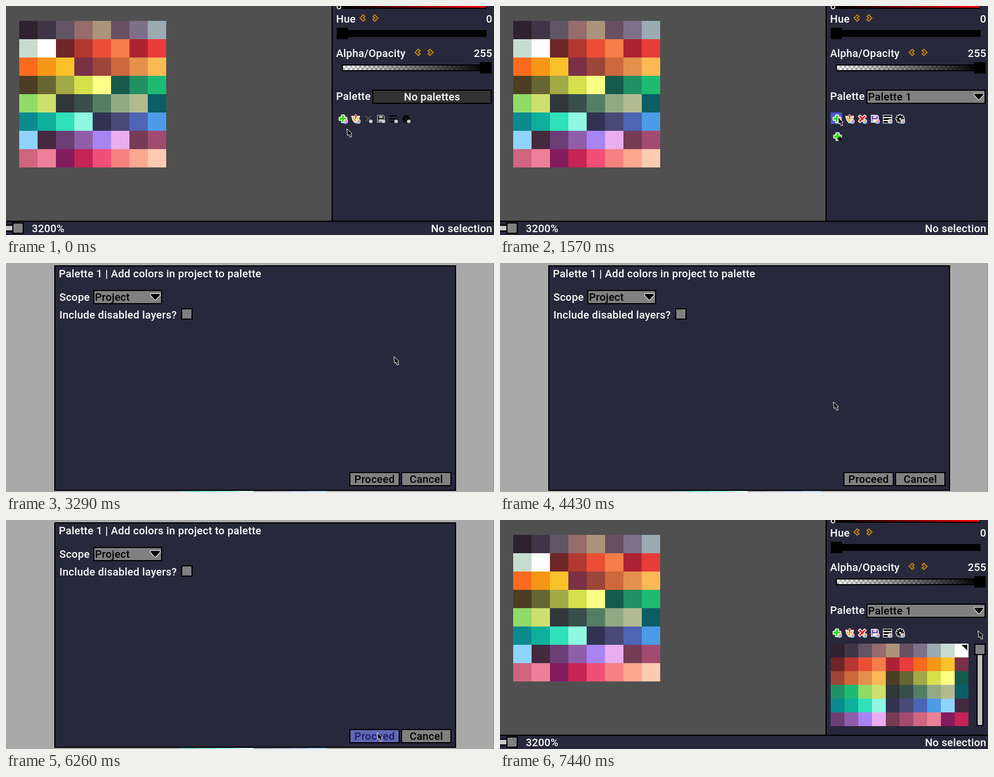
Animation of 850 by 400 pixels, one loop 8000 ms. Source, as an HTML page:

```html
<!DOCTYPE html>
<html lang="en">
<head>
<meta charset="utf-8">
<title>Palette editor</title>
<style>
  html, body { margin: 0; width: 100%; height: 100%; overflow: hidden; background: #505050; }
  svg { display: block; width: 850px; height: 400px; }
  text { font: 500 18.5px Roboto, "Open Sans", sans-serif; letter-spacing: .25px; fill: #fff; }
  text.dark { fill: #000; }
  rect { shape-rendering: crispEdges; }
  .outlined { stroke: #fff; stroke-width: 3; paint-order: stroke; stroke-linejoin: round; }
</style>
</head>
<body>
<svg id="stage" viewBox="0 0 850 400"></svg>
<script>
const LOOP = 8000;
const CANVAS = '#505050', PANEL = '#28283c', GRAY = '#808080';
const COLORS = `2e222f 3e3546 625565 966c6c ab947a 694f62 7f708a 9babb2
  c7dcd0 ffffff 6e2727 b33831 ea4f36 f57d4a ae2334 e83b3b
  fb6b1d f79617 f9c22b 7a3045 9e4539 cd683d e6904e fbb954
  4c3e24 676633 a2a947 d5e04b fbff86 165a4c 239063 1ebc73
  91db69 cddf6c 313638 374e4a 547e64 92a984 b2ba90 0b5e65
  0b8a8f 0eaf9b 30e1b9 8ff8e2 323353 484a77 4d65b4 4d9be6
  8fd3ff 45293f 6b3e75 905ea9 a884f3 eaaded 753c54 a24b6f
  cf657f ed8099 831c5d c32454 f04f78 f68181 fca790 fdcbb0`.split(/\s+/);

const rect = (x, y, w, h, fill, extra = '') =>
  `<rect x="${x}" y="${y}" width="${w}" height="${h}" fill="${fill}" ${extra}/>`;
// Filled box with a 2px black border inside its bounds.
const box = (x, y, w, h, fill, extra = '') =>
  rect(x, y, w, h, '#000') + rect(x + 2, y + 2, w - 4, h - 4, fill, extra);
const text = (x, y, str, anchor = 'start', extra = '') =>
  `<text x="${x}" y="${y}" text-anchor="${anchor}" ${extra}>${str}</text>`;
const at = (x, y, body) => `<g transform="translate(${x} ${y})">${body}</g>`;
const swatches = (list, cols, size, x, y) => list.map((c, i) =>
  rect(x + i % cols * size, y + Math.floor(i / cols) * size, size, size, '#' + c)).join('');

const dropArrow = (x, y) => at(x, y,
  '<path d="M-8-5H8V-3L1 5H-1L-8-3Z" stroke="#fff" stroke-width="2" paint-order="stroke" stroke-linejoin="round"/>');
const chevron = (x, y, dir) => `<path transform="translate(${x} ${y}) scale(${dir} 1)"
  d="M-4.5 0 1-5.5 4.5-3 1.5 0 4.5 3 1 5.5Z" fill="#50340c" stroke="#cf9420" stroke-width="1.5"/>`;
const stepper = (x, y) => chevron(x, y, 1) + chevron(x + 22.5, y, -1);

const plus = '<path class="outlined" d="M-2-6H2V-2H6V2H2V6H-2V2H-6V-2H-2Z" fill="#3fd420"/>';
const wheel = on => at(4.5, 4.5, on
  ? `<circle r="4" fill="#fff"/><path d="M0 0V-3A3 3 0 0 1 3 0Z" fill="#ff70b0"/><path d="M0 0H3A3 3 0 0 1 0 3Z" fill="#b070ff"/>
     <path d="M0 0V3A3 3 0 0 1-3 0Z" fill="#40d0ff"/><path d="M0 0H-3A3 3 0 0 1 0-3Z" fill="#ffd850"/>`
  : '<circle r="3" fill="#d8d8d8"/><circle r="1" fill="#aaa"/>');
const icon = (x, body, on) => at(x, 197, body + wheel(on));

const importIcon = `<path class="outlined" d="M-6-4-3-2 0 1 3-2 6-4 4 2 1 6H-1L-4 2Z" fill="#f0b028"/>
  <path d="M0-8 4-4H1.5V1H-1.5V-4H-4Z" fill="#e04828" stroke="#fff" stroke-width=".8"/>`;
const cross = on => `<path ${on ? 'class="outlined"' : ''} fill="${on ? '#f01818' : '#484850'}"
  d="M-6-4-4-6 0-2 4-6 6-4 2 0 6 4 4 6 0 2-4 6-6 4-2 0Z"/>`;
const floppy = on => `<path d="M-6-6H4L6-4V6H-6Z" fill="${on ? '#6048a0' : '#222'}" stroke="${on ? '#fff' : '#999'}" stroke-width="1.5"/>
  ${rect(-3, -5, 6, 4, on ? '#d8ccff' : '#aaa')}${rect(-4, 1, 8, 4, on ? '#fff' : '#bbb')}`;
const lines = on => [-6, -1, 4].map(y =>
  (on ? rect(-8, y - 1, 16, 5, '#fff') : '') + rect(-7, y, 14, on ? 3 : 2, '#000')).join('');
const gearShape = (color, grow) =>
  `<g stroke="${color}" stroke-width="${2.6 + grow}"><circle r="${5 + grow / 2}" fill="${color}" stroke="none"/>
  ${[0, 45, 90, 135].map(a => `<path d="M${-7 - grow / 2} 0H${7 + grow / 2}" transform="rotate(${a})"/>`).join('')}</g>`;
const gear = on => (on ? gearShape('#fff', 2) : '') + gearShape('#000', 0) +
  `<circle r="1.8" fill="${on ? '#fff' : PANEL}"/>`;
const editIcons = on =>
  icon(631, cross(on), on) + icon(653, floppy(on), on) + icon(675, lines(on), on) + icon(697, gear(on), on);

const defs = `<defs>
  <linearGradient id="red"><stop stop-color="#000"/><stop offset="1" stop-color="#f00"/></linearGradient>
  <linearGradient id="fade"><stop stop-color="#000" stop-opacity="0"/><stop offset="1" stop-color="#000"/></linearGradient>
  <pattern id="checker" x="587" y="104" width="8" height="8" patternUnits="userSpaceOnUse">
    ${rect(0, 0, 8, 8, '#fff') + rect(4, 0, 4, 4, '#b8b8b8') + rect(0, 4, 4, 4, '#b8b8b8')}
  </pattern></defs>`;

const editor = rect(0, 0, 850, 400, CANVAS) + swatches(COLORS, 8, 32, 23, 26) +
  rect(567, 0, 283, 376, PANEL) + rect(567, 0, 2, 376, '#000') +
  rect(0, 375, 850, 25, PANEL) + rect(0, 375, 850, 2, '#000') +
  rect(0, 382, 12, 12, '#000') + rect(0, 384, 12, 8, '#c8c8c8') + box(11, 378, 20, 20, GRAY) +
  text(45, 395, '3200%') + text(847, 395, 'No selection', 'end') +
  rect(577, 0, 260, 5, '#000') + rect(583, 0, 253, 3, 'url(#red)') +
  '<circle cx="580" cy="2" r="3" fill="#000" stroke="#fff" stroke-width="1.6"/>' +
  text(575, 29, 'Hue') + stepper(621, 21) + text(847, 29, '0', 'end') +
  rect(577, 42, 260, 12, '#000') + rect(576, 38, 20, 20, '#000') +
  text(575, 89, 'Alpha/Opacity') + stepper(717, 81) + text(847, 89, '255', 'end') +
  rect(585, 102, 252, 12, '#000') + rect(587, 104, 248, 8, 'url(#checker)') + rect(587, 104, 248, 8, 'url(#fade)') +
  rect(826, 98, 20, 20, '#000') + text(575, 164, 'Palette') +
  rect(576, 186, 20, 20, '#4c58c8', 'id="addHover"') +
  icon(587, plus, true) + icon(609, importIcon, true) +
  `<g id="noPalette">${box(638, 146, 208, 25, '#333') + text(742, 165, 'No palettes', 'middle') + editIcons(false)}</g>
  <g id="hasPalette">${box(638, 146, 208, 25, GRAY) + text(641, 165, 'Palette 1', 'start', 'class="dark"') +
    dropArrow(834, 158) + editIcons(true)}</g>
  <g id="emptyPalette">${at(588, 228, plus + '<circle cx="4" cy="4" r="3.2"/>')}</g>
  <g id="fullPalette">${swatches(COLORS.slice(0, 60), 10, 24, 576, 216)}
    <path d="M804 218H814V228Z"/>${box(830, 226, 12, 134, '#c0c0c0') + box(826, 216, 20, 20, GRAY)}</g>
  <g id="tooltip">${box(0, 0, 199, 25, PANEL)}
    <text x="4" y="19">New palette | <tspan fill="#6a62ff">Shift + N</tspan></text></g>`;

// The dialog covers a lightened canvas whose swatches peek out along the bottom edge.
const dialog = rect(0, 0, 850, 400, CANVAS) + swatches(COLORS.slice(40, 48), 8, 32, 303, 398) +
  rect(0, 0, 850, 400, '#fff', 'opacity=".51"') + rect(848, 0, 2, 400, '#9c9c9c') +
  box(84, 4, 700, 394, PANEL) +
  text(92, 25, 'Palette 1 | Add colors in project to palette') +
  text(93, 66, 'Scope') + box(152, 47, 120, 25, GRAY) +
  text(155, 66, 'Project', 'start', 'class="dark"') + dropArrow(260, 59) +
  text(93, 97, 'Include disabled layers?') + box(305, 79, 20, 20, GRAY) +
  box(598, 365, 88, 25, GRAY, 'id="proceedFill"') + text(642, 384, 'Proceed', 'middle', 'id="proceedText"') +
  box(688, 365, 88, 25, GRAY) + text(732, 384, 'Cancel', 'middle', 'class="dark"');

const cursorShape = `<path d="M.6.6 1.8 12 4.4 10.4 6 15 8.8 14.6 7.4 9.8 9.6 8.6Z"
  fill="#000" stroke="#fff" stroke-width="1" stroke-linejoin="round"/>`;

document.getElementById('stage').innerHTML = defs +
  `<g id="editor">${editor}</g><g id="dialog">${dialog}</g><g id="cursor">${cursorShape}</g>`;

const el = id => document.getElementById(id);
const show = (id, on) => el(id).setAttribute('visibility', on ? 'inherit' : 'hidden');
const move = (id, x, y) => el(id).setAttribute('transform', `translate(${x} ${y})`);

// Pointer poses: first time, last time, then evenly spaced points that hold until the next.
const PATH = [
  [0, 0, [593, 214]],
  [250, 490, [593, 222], [593, 230], [592, 234]],
  [700, 1070, [592, 228], [590, 215], [589, 203], [588, 197]],
  [1320, 1320, [588, 194]],
  [1900, 2590, [594, 213], [612, 243], [645, 281], [688, 321], [734, 358], [776, 390], [800, 420]],
  [3290, 3290, [675, 163]],
  [3880, 4670, [664, 153], [634, 149], [598, 162], [574, 196], [580, 242], [606, 286], [632, 320], [646, 341]],
  [4790, 5150, [648, 353], [647, 361], [646, 365], [646, 366]],
  [5390, 5390, [646, 369]],
  [6260, 6260, [646, 371]],
  [7100, 7100, [646, 369]],
  [7440, 7440, [832, 193]]
];
const POSES = PATH.flatMap(([start, end, ...points]) => points.map(([x, y], i) =>
  ({ time: start + (end - start) * i / Math.max(1, points.length - 1), x, y })));

function draw(t) {
  const { x, y } = POSES.findLast(p => p.time <= t + 0.5);
  const over = (left, top, w, h) => x >= left && x < left + w && y >= top && y < top + h;
  const created = t >= 1570, filled = t >= 7440, modal = t >= 3290 && !filled;
  const onAdd = over(576, 186, 20, 20), onProceed = over(598, 365, 88, 25);

  show('editor', !modal);
  show('dialog', modal);
  show('noPalette', !created);
  show('hasPalette', created);
  show('emptyPalette', created && !filled);
  show('fullPalette', filled);
  show('addHover', onAdd);
  show('tooltip', onAdd && !created);
  move('tooltip', x - 199, y + 9);
  el('proceedFill').setAttribute('fill', onProceed ? '#6068b4' : GRAY);
  el('proceedText').style.fill = onProceed ? '#1c1c6a' : '#000';
  move('cursor', x, y);
}

function tick() {
  draw(performance.now() % LOOP);
  requestAnimationFrame(tick);
}
tick();
</script>
</body>
</html>
```
